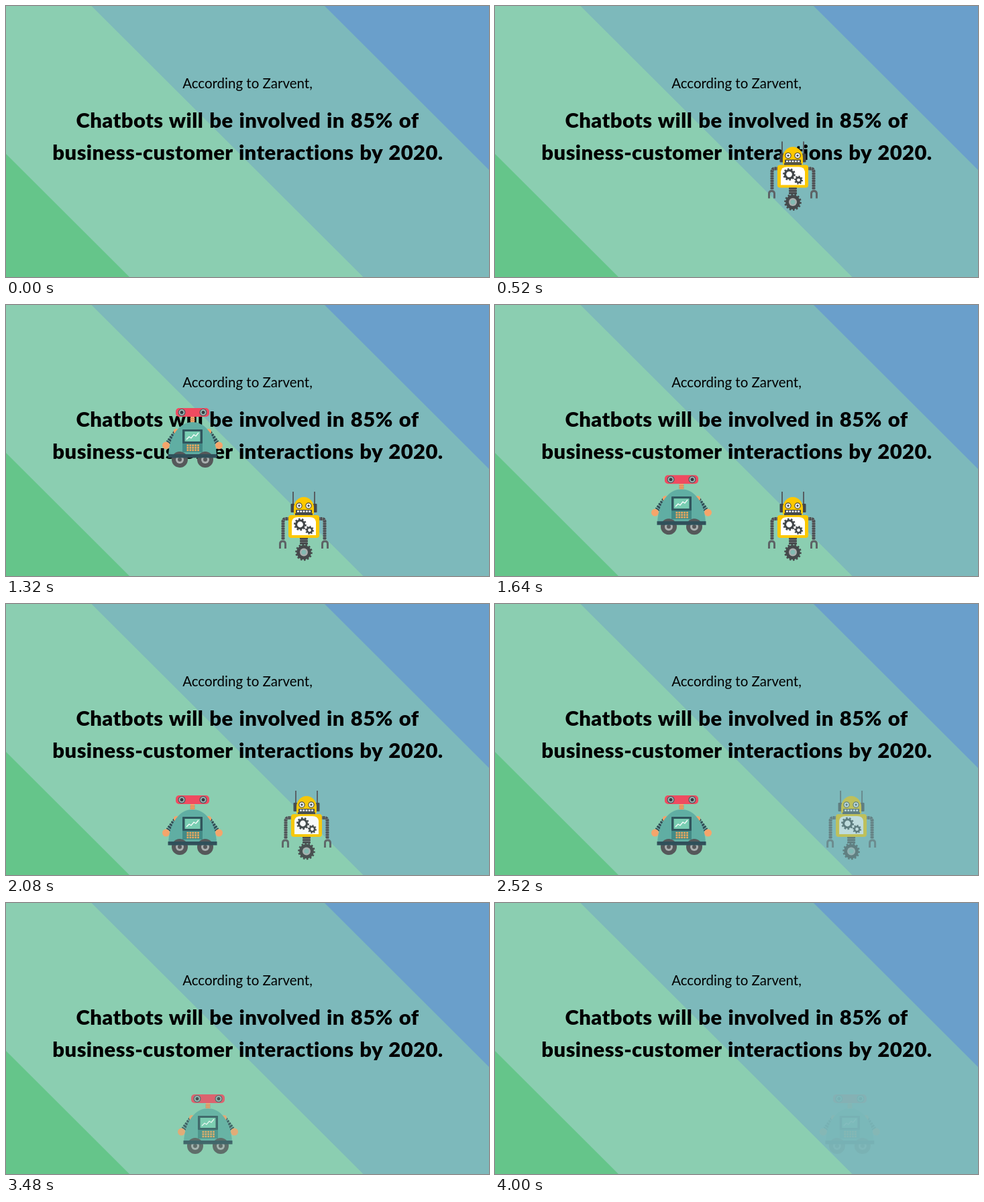
Animation, 720 px wide and 405 px high, one loop 4.36 s. Source, as an HTML page:

```html
<!DOCTYPE html>
<html lang="en">
<head>
<meta charset="utf-8">
<title>Chatbots</title>
<style>
  html, body { margin: 0; width: 100%; height: 100%; overflow: hidden; }
  svg { display: block; width: 100%; height: 100%; }
  text { font-family: Lato, "Open Sans", sans-serif; text-anchor: middle; font-variant-ligatures: none; }
  .intro { font-size: 20.5px; }
  .claim { font-size: 31px; font-weight: 900; letter-spacing: .4px; word-spacing: 1.4px; }
</style>
</head>
<body>
<svg viewBox="0 0 720 405">
  <rect width="720" height="405" fill="#8bceb1"/>
  <path d="M127.500 0H720V405H532.500Z" fill="#7db9bb"/>
  <path d="M475 0H720V245Z" fill="#6a9fcb"/>
  <path d="M0 221L184 405H0Z" fill="#65c58a"/>

  <text class="intro" x="360" y="122.500">According to Zarvent,</text>
  <text class="claim" x="360" y="181.500">Chatbots will be involved in 85% of</text>
  <text class="claim" x="360.500" y="229.500">business-customer interactions by 2020.</text>

  <!-- Both robots are drawn around x = 0 at their resting height. -->
  <g id="teal" visibility="hidden">
    <g id="tealArm">
      <path d="M-25 323L-36 338" stroke="#6fa6a2" stroke-width="5"/>
      <path d="M-25 323L-36 338" stroke="#2f4d55" stroke-width="8" stroke-dasharray="2.800 1.400"/>
      <circle cx="-24" cy="321" r="4" fill="#f5a56b"/>
      <circle cx="-39.500" cy="342" r="5.500" fill="#f5a56b"/>
    </g>
    <use href="#tealArm" transform="scale(-1 1)"/>
    <path d="M-3 299H3V308H-3Z" fill="#f5a56b"/>
    <path d="M-4 302H4M-4 305H4" stroke="#c77f4f"/>
    <path d="M-36 356C-34 325 -18 307 0 307S34 325 36 356Z" fill="#60aea3"/>
    <rect x="-25" y="286" width="50" height="13" rx="5" fill="#ef4b60"/>
    <g id="tealEye" transform="translate(-16 292.500)">
      <circle r="5.500" fill="#4b5a60"/>
      <circle r="4.300" fill="#a3b9b8"/>
      <circle r="2.500" fill="#333c42"/>
    </g>
    <use href="#tealEye" x="32"/>
    <rect x="-15" y="318" width="30" height="34" fill="#438b87"/>
    <rect x="-15" y="318" width="30" height="21" rx="1" fill="#30555d"/>
    <rect x="-11.500" y="321" width="23" height="15" fill="#79cdb2"/>
    <path d="M-9 333L-5 329L-2 331L2 326L5 328L9 323" fill="none" stroke="#fff" stroke-width="1.300"/>
    <path d="M-8.500 342H10M-8.500 345.500H10M-8.500 349H10" stroke="#f2a85c" stroke-width="2.600" stroke-dasharray="2.800 1.100"/>
    <g id="tealWheel" transform="translate(-19 363)">
      <circle r="12" fill="#55585a"/>
      <circle r="6" fill="#a9afaf"/>
      <circle r="3" fill="#55585a"/>
    </g>
    <use href="#tealWheel" x="38"/>
    <rect x="-36.500" y="355" width="73" height="5.500" fill="#30505a"/>
  </g>

  <g id="yellow" visibility="hidden">
    <g id="yellowSide">
      <path d="M-16 279V300" stroke="#565d62" stroke-width="2"/>
      <rect x="-19.500" y="297" width="6" height="13" rx="1" fill="#43474a"/>
      <path d="M-21 319.500H-27Q-31 319.500 -31 324V351" fill="none" stroke="#777d80" stroke-width="4"/>
      <path d="M-21 319.500H-27Q-31 319.500 -31 324V351" fill="none" stroke="#4b4f52" stroke-width="5" stroke-dasharray="2.600 1"/>
      <path d="M-35.500 364V357Q-35.500 353 -31.500 353T-27.500 357V364" fill="none" stroke="#5d6366" stroke-width="3"/>
    </g>
    <use href="#yellowSide" transform="scale(-1 1)"/>
    <path d="M-15 313V303A15 16 0 0 1 15 303V313Z" fill="#fdc800"/>
    <g id="yellowEye" transform="translate(-7 300)">
      <circle r="4.700" fill="#45494b"/>
      <circle r="3.500" fill="#fff"/>
      <circle r="1.700" fill="#45494b"/>
    </g>
    <use href="#yellowEye" x="14"/>
    <rect x="-12" y="306" width="24" height="5" rx="1" fill="#45494b"/>
    <path d="M-10 308.500H10" stroke="#fff" stroke-width="2.400" stroke-dasharray="2.800 1.500"/>
    <rect x="-13" y="311" width="26" height="4" fill="#45494b"/>
    <rect x="-23" y="314" width="46" height="34" rx="4" fill="#fdc800"/>
    <path d="M-18 344V324Q-17 317 -9 317H9Q17 317 18 324V344Z" fill="#fff"/>
    <g fill="none" stroke="#414548">
      <circle cx="-5.500" cy="328" r="6" stroke-width="3.200"/>
      <circle cx="-5.500" cy="328" r="8.200" stroke-width="2.400" pathLength="20" stroke-dasharray="1"/>
      <circle cx="8.500" cy="336.500" r="3.700" stroke-width="2.600"/>
      <circle cx="8.500" cy="336.500" r="5.500" stroke-width="2" pathLength="16" stroke-dasharray="1"/>
    </g>
    <path d="M0 348V358" stroke="#777d80" stroke-width="10"/>
    <path d="M0 348V358" stroke="#45494b" stroke-width="12" stroke-dasharray="2.500 1"/>
    <circle cy="369.500" r="10.800" fill="#45494b"/>
    <circle cy="369.500" r="11.500" fill="none" stroke="#45494b" stroke-width="2.600" pathLength="28" stroke-dasharray="1"/>
    <circle cy="369.500" r="6" fill="#a9afaf"/>
    <circle cy="369.500" r="3.600" fill="#82b9b1"/>
  </g>
</svg>
<script>
const LOOP = 4360, LAST_STEP = 4000, STEP = 40;
const FALL = 254, REBOUND = 0.6, EXIT = 980;

const robots = [
  { id: 'yellow', x: 444, drop: 382, enter: 12, exit: 1835, travel: 255 },
  { id: 'teal', x: 278, drop: 375, enter: 936, exit: 3053, travel: 278 },
];
for (const robot of robots) robot.node = document.getElementById(robot.id);

// Height above the floor, from 1 at release to 0 at rest.
function bounce(time) {
  if (time <= 0) return 1;
  let half = FALL;
  time += half;
  while (time > 2 * half && half > 8) {
    time -= 2 * half;
    half *= REBOUND;
  }
  return half > 8 ? (half / FALL) ** 2 * (1 - (time / half - 1) ** 2) : 0;
}

function draw(now) {
  const time = Math.floor(Math.min(now % LOOP, LAST_STEP) / STEP) * STEP;
  for (const { node, x, drop, enter, exit, travel } of robots) {
    const leaving = Math.min(1, Math.max(0, (time - exit) / EXIT));
    const left = x + travel * leaving ** 3;
    const top = -drop * bounce(time - enter);
    node.setAttribute('transform', `translate(${left} ${top})`);
    node.setAttribute('opacity', 1 - leaving ** 2);
    node.setAttribute('visibility', time > enter ? 'visible' : 'hidden');
  }
  requestAnimationFrame(draw);
}
requestAnimationFrame(draw);
</script>
</body>
</html>
```
